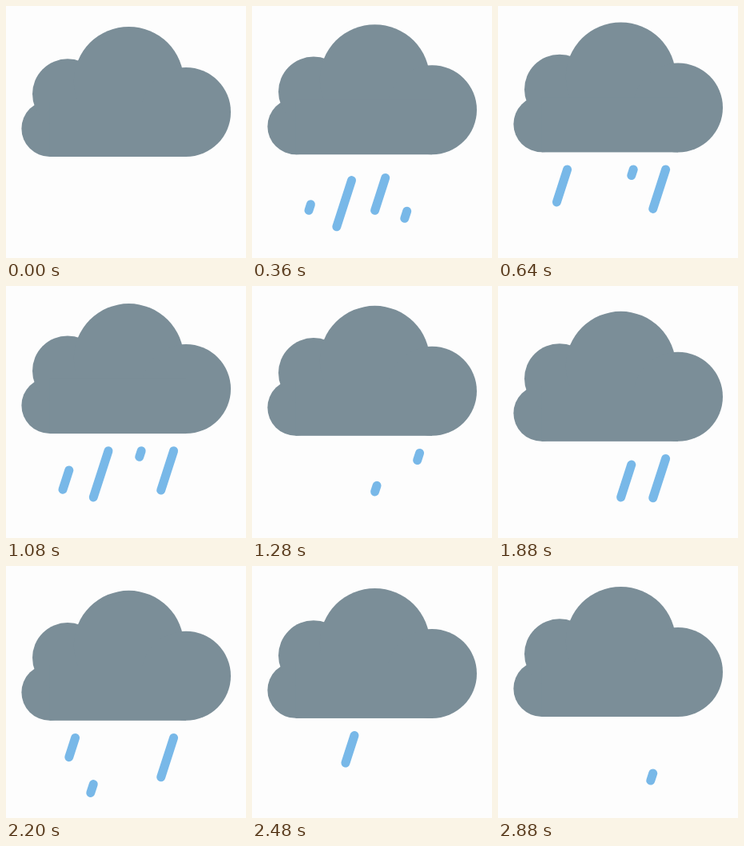
An HTML page that plays this animation: 300x316 px, repeating every 2.92 s.

```html
<!DOCTYPE html>
<html lang="en">
<head>
<meta charset="utf-8">
<title>Rain cloud</title>
<style>
  html, body { margin: 0; width: 100%; height: 100%; overflow: hidden; background: #fdfdfd; }
  svg { display: block; width: 100%; height: 100%; }
  #cloud { fill: #7b8e98; }
  #rain { stroke: #78b8e8; stroke-width: 11; stroke-linecap: round; }
</style>
</head>
<body>
<svg viewBox="0 0 300 316">
  <g id="scene">
    <g id="cloud">
      <circle cx="54.6" cy="153.7" r="35.2"/>
      <circle cx="77" cy="110.3" r="44"/>
      <circle cx="153.5" cy="94.7" r="68.7"/>
      <circle cx="225" cy="133" r="56"/>
      <rect x="54.6" y="120" width="170.4" height="69"/>
    </g>
    <g id="rain"></g>
  </g>
</svg>
<script>
const STEP = 40, FRAMES = 73;
const GROW = 4, SHRINK_DELAY = 3, LIFE = 7;
const SLANT = -0.322;

// Each column: top x, path length downwards, and the steps at which a drop starts.
const TOP = 210.6;
const columns = [
  { x: 86.6, length: 48.5, starts: [3, 13, 22, 32, 40, 53, 62] },
  { x: 128, length: 69, starts: [5, 16, 24, 38, 49, 60] },
  { x: 169.2, length: 48.5, starts: [5, 15, 26, 35, 43, 55, 64] },
  { x: 209.6, length: 58.5, starts: [3, 13, 24, 31, 44, 52, 66] }
];
const bobKeys = [[0, 0], [19, -6], [49, 6], [70, 0], [73, 0]];

const scene = document.getElementById("scene");
const rain = document.getElementById("rain");

for (const column of columns) {
  column.line = document.createElementNS("http://www.w3.org/2000/svg", "line");
  rain.append(column.line);
}

function ease(u) {
  u = Math.min(1, Math.max(0, u));
  return u * u * (3 - 2 * u);
}

function bob(step) {
  const i = bobKeys.findIndex(([end]) => step < end);
  const [t0, y0] = bobKeys[i - 1], [t1, y1] = bobKeys[i];
  return y0 + (y1 - y0) * ease((step - t0) / (t1 - t0));
}

function drawDrop({ line, x, length, starts }, step) {
  const start = starts.find(s => step > s && step < s + LIFE);
  line.style.display = start === undefined ? "none" : "";
  if (start === undefined) return;
  const age = step - start;
  const tail = length * ease((age - SHRINK_DELAY) / GROW);
  const head = length * ease(age / GROW);
  line.setAttribute("x1", x + SLANT * tail);
  line.setAttribute("y1", TOP + tail);
  line.setAttribute("x2", x + SLANT * head);
  line.setAttribute("y2", TOP + head);
}

function draw(ms) {
  const step = Math.floor(ms / STEP + 1e-6) % FRAMES;
  scene.setAttribute("transform", `translate(0 ${bob(step)})`);
  for (const column of columns) drawDrop(column, step);
}

let origin;
function tick(now) {
  origin ??= now;
  draw(Math.max(0, now - origin));
  requestAnimationFrame(tick);
}
draw(0);
requestAnimationFrame(tick);
</script>
</body>
</html>
```
